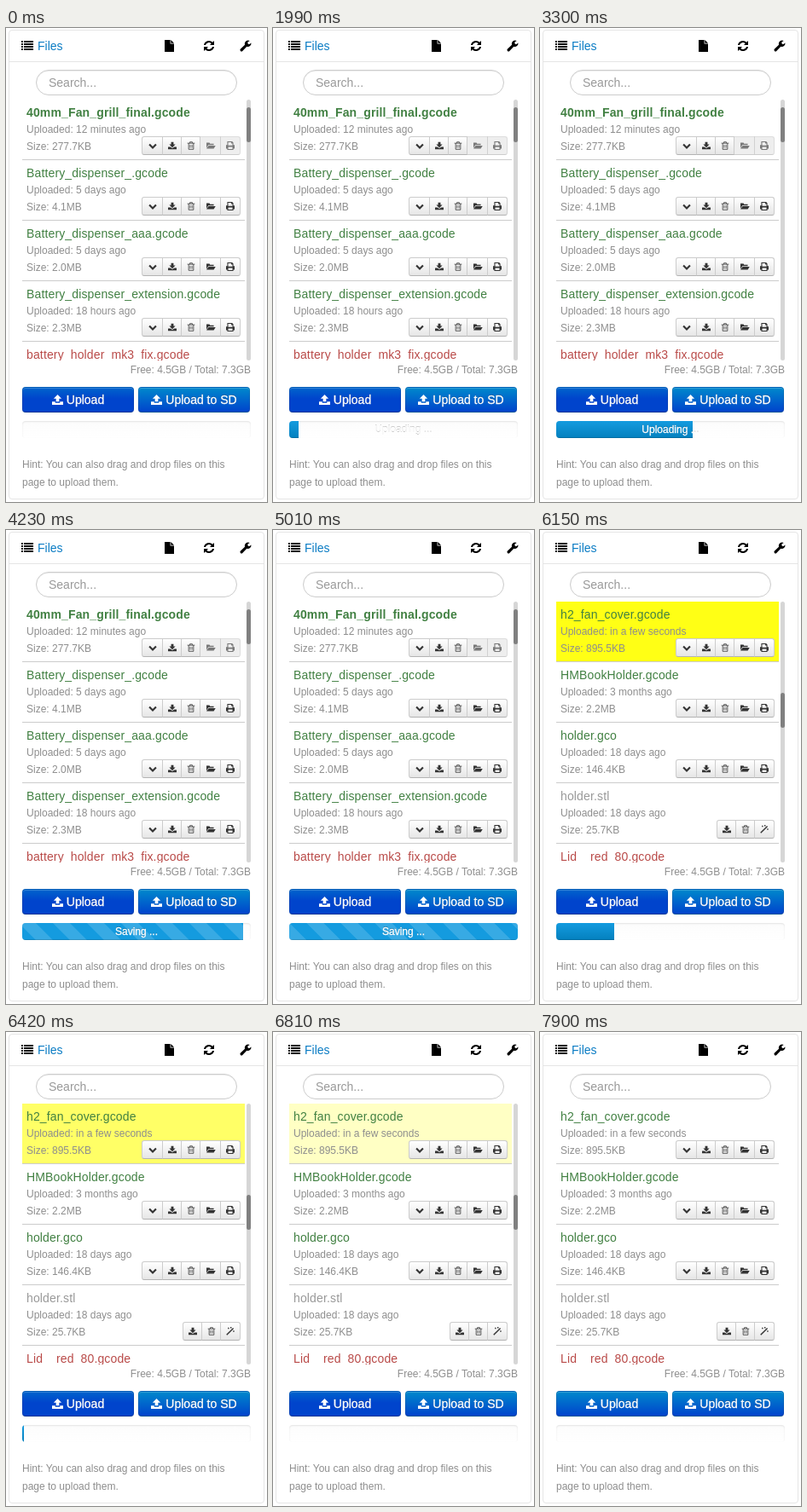
These frames come from a looping animation (306x556 px, 9.45 s). An HTML page:

```html
<!DOCTYPE html>
<html lang="en">
<head>
<meta charset="utf-8">
<title>File upload</title>
<style>
  html, body { margin: 0; width: 100%; height: 100%; overflow: hidden; background: #fff; }
  body { position: relative; font: 14px/20px "Liberation Sans", Arial, sans-serif; color: #333; }
  div, svg.at { position: absolute; box-sizing: border-box; white-space: nowrap; }
  svg { display: block; overflow: visible; fill: currentColor; fill-rule: evenodd; }
  svg .line { fill: none; stroke: currentColor; }
  .small { font-size: 12px; color: #8e8e8e; }

  #panel { left: 3px; top: 2px; width: 300px; height: 551px; border: 1px solid #e5e5e5; border-radius: 4px; }
  #heading { left: 3px; top: 39px; width: 300px; height: 1px; background: #e5e5e5; }
  #title { left: 37px; top: 11px; color: #0a7cc4; }
  #search { left: 35px; top: 49px; width: 236px; height: 30px; padding: 4px 14px; color: #999;
    border: 1px solid #ccc; border-radius: 15px; box-shadow: inset 0 1px 1px rgba(0,0,0,.075); }

  #list { left: 19px; top: 84px; width: 261px; height: 306px; overflow: hidden; }
  .row { left: 0; width: 261px; height: 71px; border-bottom: 1px solid #ccc; }
  .row > div { left: 5px; }
  .row > .name { top: 5px; letter-spacing: .01em; }
  .row > .date { top: 25px; }
  .row > .size { top: 45px; }
  .row > .tools { left: auto; right: 5px; top: 43px; display: flex; }
  .tool { position: static; height: 22px; margin-left: -1px; display: flex;
    align-items: center; justify-content: center; border: 1px solid #ccc; border-bottom-color: #b3b3b3;
    background: linear-gradient(#fff, #e6e6e6); }
  .tool:first-child { border-radius: 3px 0 0 3px; }
  .tool:last-child { border-radius: 0 3px 3px 0; }
  .tool.off { background: #e6e6e6; opacity: .65; }
  .ok { color: #418042; }
  .bad { color: #b94a48; }
  .muted { color: #999; }
  .bold { font-weight: bold; }

  #rail, #thumb { left: 282px; width: 5px; border-radius: 5px; }
  #rail { top: 84px; height: 306px; background: #333; }
  #thumb { height: 41px; background: #000; }

  #free { right: 19px; top: 391px; }
  .upload, #label { color: #fff; text-shadow: 0 -1px 0 rgba(0,0,0,.25); -webkit-text-stroke: .3px #fff; }
  .upload { --hover: 0; top: 421px; height: 30px; width: 131px; display: flex; align-items: center;
    justify-content: center; gap: 4px; border: 1px solid rgba(0,0,0,.1); border-bottom-color: rgba(0,0,0,.25);
    border-radius: 4px; box-shadow: inset 0 1px 0 rgba(255,255,255,.2), 0 1px 2px rgba(0,0,0,.05);
    background: linear-gradient(#08c, #04c) 0 calc(-15px * var(--hover)) repeat-x;
    background-color: color-mix(in srgb, #04c calc(100% * var(--hover)), #006dcc); }
  #upload { left: 19px; }
  #uploadSd { left: 155px; }

  #progress { left: 19px; top: 461px; width: 268px; height: 20px; overflow: hidden; border-radius: 4px;
    background: linear-gradient(#fcfcfc, #fff); box-shadow: inset 0 1px 2px rgba(0,0,0,.1); }
  #bar { left: 0; top: 0; height: 20px; background: linear-gradient(#149bdf, #0480be);
    box-shadow: inset 0 -1px 0 rgba(0,0,0,.15); }
  #bar.striped { background: #149bdf linear-gradient(45deg, rgba(255,255,255,.15) 25%, transparent 25% 50%,
    rgba(255,255,255,.15) 50% 75%, transparent 75%) 0 0 / 40px 40px; }
  #label { width: 268px; text-align: center; font-size: 12px; }
  #hint { left: 19px; top: 502px; line-height: 21px; }
</style>
</head>
<body>
<div id="panel"></div>
<div id="heading"></div>
<div id="title">Files</div>
<div id="search">Search...</div>
<div id="list"></div>
<div id="rail"></div>
<div id="thumb"></div>
<div id="free" class="small">Free: 4.5GB / Total: 7.3GB</div>
<div id="upload" class="upload"></div>
<div id="uploadSd" class="upload"></div>
<div id="progress"><div id="bar"></div><div id="label"></div></div>
<div id="hint" class="small">Hint: You can also drag and drop files on this<br>page to upload them.</div>
<script>
const LOOP = 9450;
const $ = id => document.getElementById(id);
const clamp = x => Math.min(1, Math.max(0, x));

// Icons on a 14-unit grid: path, then a stroke width for line icons
const ICONS = {
  list: ['M0 2h2M3 2h11M0 5h2M3 5h11M0 8h2M3 8h11M0 11h2M3 11h11', 2],
  file: ['M1 0h6.6v4.4H12V14H1zM8.3 0L12 3.7H8.3z'],
  refresh: ['M13 1v5H8l1.7-1.7A4 4 0 0 0 3 6H1A6 6 0 0 1 11.2 2.8zM1 13V8h5L4.3 9.7A4 4 0 0 0 11 8h2A6 6 0 0 1 2.8 11.2z'],
  wrench: ['M13.5 3.5a4 4 0 0 1-5.2 4.3L3.3 13a1.6 1.6 0 0 1-2.3-2.4L6 5.7A4 4 0 0 1 9.6 .5q1.5 0 2.2 .5L9.4 2.4v1.9l1.6 1z'],
  upload: ['M5 9V5H2l5-5 5 5H9v4zM0 9h4v1.5h6V9h4v4H0z'],
  download: ['M5 1h4v4h3L7 10 2 5h3zM0 9h4l2 2h2l2-2h4v4H0z'],
  chevron: ['M1.5 5L7 10.5 12.5 5', 3],
  trash: ['M1 3h12M5 3V1h4v2M3 3v10h8V3M5.5 5.5v5M8.5 5.5v5', 1.1],
  folder: ['M0 11V2h5l1 2h6v2H3zM3.5 7H15l-3 5H0z'],
  print: ['M2 0h8l2 2v4h2v6h-2v2H2v-2H0V6h2zM3.5 1.5v5h7v-3h-2v-2zM3.5 9v3.5h7V9z'],
  magic: ['M1 13L12 2M4 1v2M8 0v2M12.5 6v2', 2],
};

function icon(name, size, attrs = '') {
  const [path, width] = ICONS[name];
  const stroke = width ? `class="line" stroke-width="${width}"` : '';
  return `<svg width="${size}" height="${size}" viewBox="0 0 14 14" ${attrs}><path d="${path}" ${stroke}/></svg>`;
}

const TOOL_WIDTH = { chevron: 25, download: 23, trash: 23, folder: 25, print: 24, magic: 24 };
const FULL = ['chevron', 'download', 'trash', 'folder', 'print'];
const MODEL = ['download', 'trash', 'magic'];

function row([name, date, size, style = 'ok', tools = FULL, locked = []], i) {
  const buttons = tools.map(tool => `<div class="tool ${locked.includes(tool) ? 'off' : ''}"
    style="width:${TOOL_WIDTH[tool]}px">${icon(tool, 10)}</div>`).join('');
  return `<div class="row" style="top:${i * 71}px"><div class="name ${style}">${name}</div>
    <div class="date small">Uploaded: ${date}</div><div class="size small">Size: ${size}</div>
    <div class="tools">${buttons}</div></div>`;
}

const BEFORE = [
  ['40mm_Fan_grill_final.gcode', '12 minutes ago', '277.7KB', 'ok bold', FULL, ['folder', 'print']],
  ['Battery_dispenser_.gcode', '5 days ago', '4.1MB'],
  ['Battery_dispenser_aaa.gcode', '5 days ago', '2.0MB'],
  ['Battery_dispenser_extension.gcode', '18 hours ago', '2.3MB'],
  ['battery_holder_mk3_fix.gcode', '', '', 'bad'],
].map(row).join('');

const AFTER = [
  ['h2_fan_cover.gcode', 'in a few seconds', '895.5KB'],
  ['HMBookHolder.gcode', '3 months ago', '2.2MB'],
  ['holder.gco', '18 days ago', '146.4KB'],
  ['holder.stl', '18 days ago', '25.7KB', 'muted', MODEL],
  ['Lid__red_80.gcode', '', '', 'bad'],
].map(row).join('');

for (const [name, x] of [['list', 18], ['file', 185], ['refresh', 231], ['wrench', 274]])
  document.body.insertAdjacentHTML('beforeend',
    icon(name, 14, `class="at" style="left:${x}px;top:14px;color:#000"`));
$('upload').innerHTML = icon('upload', 13) + 'Upload';
$('uploadSd').innerHTML = icon('upload', 13) + 'Upload to SD';

// The screen refreshes only at these moments
const TICKS = [0, 1840, 1990, 2120, 2270, 2390, 2510, 2630, 2750, 2900, 3030, 3150, 3300, 3450, 3570,
  3720, 3840, 3960, 4110, 4230, 4380, 4500, 4620, 4740, 4890, 5010, 5160, 5280, 5400, 5550, 5700, 5850,
  6000, 6150, 6300, 6420, 6540, 6660, 6810, 6960, 7090, 7210, 7360, 7480, 7630, 7780, 7900];

// Upload progress: time, bar width
const PROGRESS = [[1840, 1], [2120, 19], [2750, 102], [3150, 147], [3300, 160], [3570, 211],
  [3960, 244], [4230, 259], [4500, 268]];
const SAVING = 4110, SAVED = 6000;

// CSS "ease": cubic-bezier(.25, .1, .25, 1)
function ease(x) {
  x = clamp(x);
  let lo = 0, hi = 1;
  for (let i = 0; i < 20; i++) {
    const u = (lo + hi) / 2;
    if (.75 * u * (1 - u) + u ** 3 < x) lo = u; else hi = u;
  }
  return .3 * lo * (1 - lo) ** 2 + 3 * lo * lo * (1 - lo) + lo ** 3;
}

function barWidth(t) {
  if (t < PROGRESS[0][0]) return 0;
  if (t >= SAVED) return 268 * (1 - ease((t - 5880) / 600));
  const next = PROGRESS.findIndex(([time]) => time > t);
  if (next < 0) return 268;
  const [t0, w0] = PROGRESS[next - 1], [t1, w1] = PROGRESS[next];
  return w0 + (w1 - w0) * (t - t0) / (t1 - t0);
}

let shown;
function draw(t) {
  const saved = t >= SAVED, saving = t >= SAVING && !saved;
  const rows = saved ? AFTER : BEFORE;
  if (shown !== rows) $('list').innerHTML = shown = rows;
  $('list').firstElementChild.style.backgroundColor =
    saved ? `rgba(255,255,0,${1 - ease((t - 5990) / 1750)})` : '';

  const visible = 1 - clamp((t - 6880) / 600);
  $('rail').style.opacity = .2 * visible;
  $('thumb').style.opacity = .4 * visible;
  $('thumb').style.top = (saved ? 191 : 93) + 'px';

  const bar = $('bar');
  bar.className = saving ? 'striped' : '';
  bar.style.width = Math.round(barWidth(t)) + 'px';
  bar.style.backgroundPosition = saving ? `${40 - (t - 4050) * .02 % 40}px 0` : '';
  $('label').textContent = saving ? 'Saving ...' : t >= 1840 && !saved ? 'Uploading ...' : '';

  // The pointer leaves the button near the end
  $('upload').style.setProperty('--hover', 1 - clamp((t - 7720) / 100));
}

function loop() {
  const t = performance.now() % LOOP;
  draw(TICKS.findLast(tick => tick <= t));
  requestAnimationFrame(loop);
}
loop();
</script>
</body>
</html>
```
